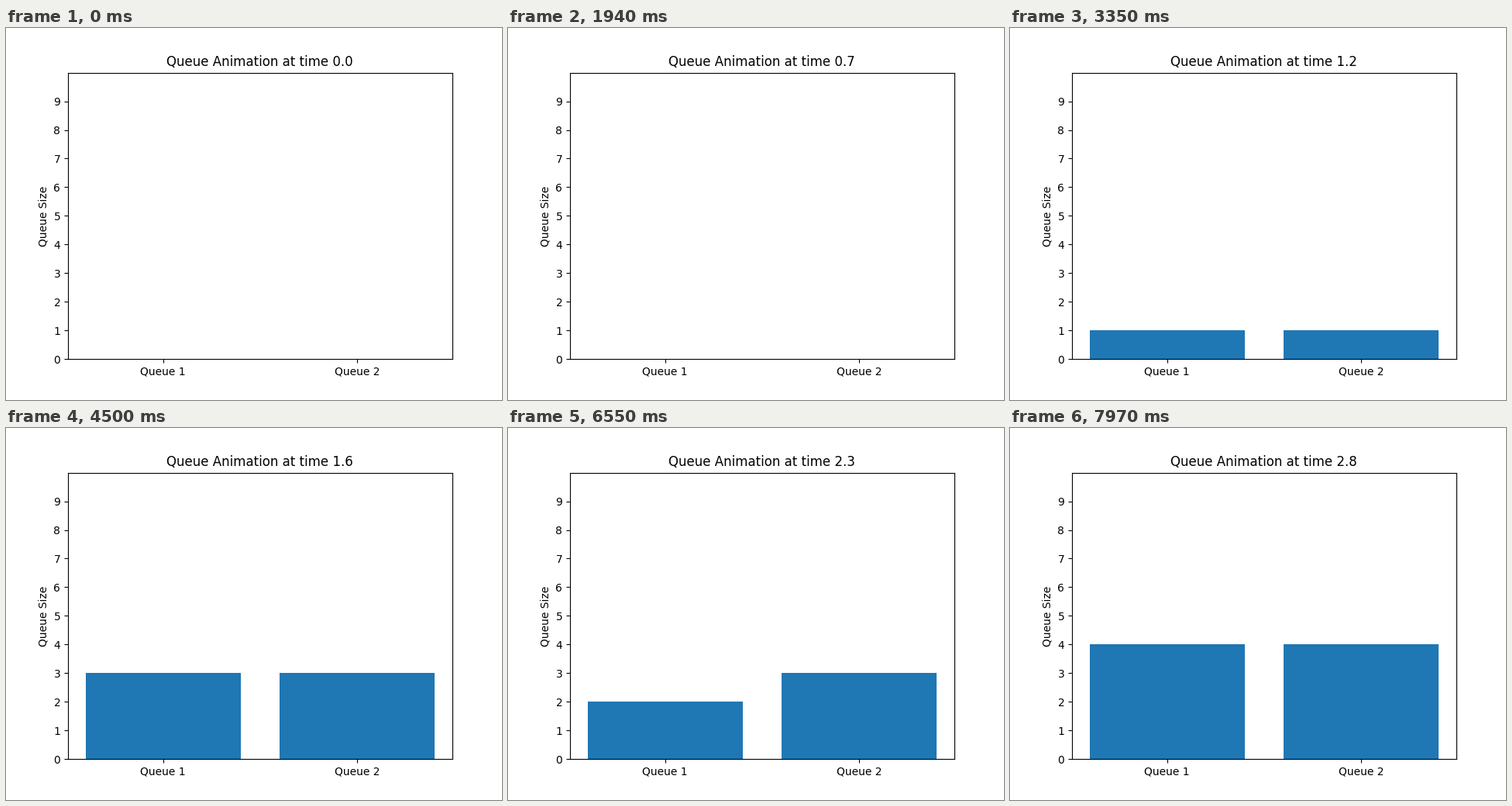
Write a matplotlib script that moves like this. It is 640x480 px and loops after 8000 ms.

```python
import matplotlib.pyplot as plt
from matplotlib.animation import FuncAnimation

STEP = 20          # ms per drawn frame
LOOP = 8000        # ms per loop
TIME_UNIT = 2893   # ms per unit of simulated time
LEAD = 15          # ms before the clock starts

# Customers come (ms) and join the shorter queue; a few leave (ms, queue)
ARRIVALS = [300, 2030, 2720, 3480, 3640, 4310, 4400, 5530, 6610, 6990, 7490]
DEPARTURES = [(890, 0), (4930, 1), (5820, 0)]


def queue_sizes(now):
    """Replay all events up to now and return both queue lengths."""
    sizes = [0, 0]
    events = sorted([(t, None) for t in ARRIVALS] + DEPARTURES)
    for t, leaving in events:
        if t >= now:
            break
        if leaving is None:
            sizes[sizes.index(min(sizes))] += 1
        else:
            sizes[leaving] -= 1
    return sizes


fig, ax = plt.subplots(figsize=(6.4, 4.8), dpi=100)
bars = ax.bar(["Queue 1", "Queue 2"], [1, 1], color="#1f77b4")
ax.set_xlim(-0.49, 1.49)
ax.set_ylim(0, 10)
ax.set_yticks(range(10))
ax.set_ylabel("Queue Size")
title = ax.set_title("", x=0.498)


def update(frame):
    now = (frame + 1) * STEP
    clock = (now - LEAD) / TIME_UNIT
    title.set_text(f"Queue Animation at time {clock:.1f}")
    for bar, size in zip(bars, queue_sizes(now)):
        bar.set_height(size)
        bar.set_visible(size > 0)
    return [title, *bars]


anim = FuncAnimation(fig, update, frames=LOOP // STEP, interval=STEP,
                     init_func=lambda: update(0), repeat=True,
                     repeat_delay=0, blit=False)
plt.show()
```
